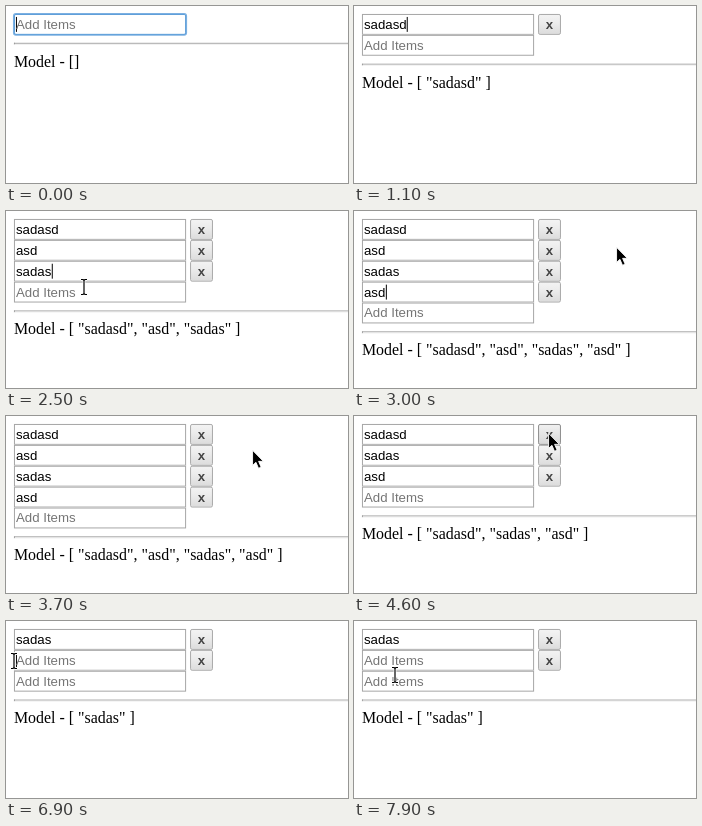
An HTML page for the animation above (8000 ms loop, 342 by 177 pixels).

```html
<!DOCTYPE html>
<html lang="en">
<head>
<meta charset="utf-8">
<title>Editable list</title>
<style>
  html, body { margin: 0; width: 100%; height: 100%; overflow: hidden; background: #fff; }
  #stage { position: relative; width: 342px; height: 177px; overflow: hidden; }
  #page { position: absolute; left: 0; top: 0; width: 350px; height: 177px; transform: scale(.995); transform-origin: 0 0; }
  #page > * { position: absolute; box-sizing: border-box; white-space: pre; }
  .field {
    left: 8px; width: 173px; height: 21px; padding: 2px 1px;
    border: 1px solid #a6a6a6; background: #fff; color: #000;
    font: 13.333px/15px "Liberation Sans", Arial, sans-serif;
  }
  .field.ring { border-color: #5b9dd9; border-radius: 2px; box-shadow: 0 0 0 1px #7db1e2; }
  .hint { color: #757575; }
  .picked { display: inline-block; height: 15px; background: #1e90ff; color: #fff; }
  .caret {
    display: inline-block; width: 1px; height: 15px; margin-right: -1px;
    background: #000; vertical-align: top;
  }
  .remove {
    left: 185px; width: 23px; height: 21px; border: 1px solid #a9a9a9; border-radius: 2px;
    background: linear-gradient(#f3f3f3, #ececec 40%, #dcdcdc);
    color: #444; text-align: center;
    font: bold 13.333px/19px "Liberation Sans", Arial, sans-serif;
  }
  .remove.hover { border-color: #8c8c8c; background: linear-gradient(#f0f0f0, #e6e6e6 40%, #d8d8d8); }
  #rule { left: 8px; width: 340px; height: 2px; border: 1px solid #9a9a9a; border-bottom-color: #eee; }
  #model { left: 8px; font: 16px/18px "Liberation Serif", Times, serif; color: #000; }
  #pointer { position: absolute; left: 0; top: 0; width: 20px; height: 24px; overflow: visible; }
</style>
</head>
<body>
<div id="stage">
  <div id="page">
    <div id="rule"></div>
    <div id="model"></div>
  </div>
  <svg id="pointer" viewBox="0 0 20 24">
    <path id="arrow" transform="translate(0 -1) scale(1.1)" d="M.5 .3V14L3.6 11.2L5.9 16.6L8.3 15.6L6 10.3H10.3Z" fill="#000" stroke="#fff" stroke-width=".8"/>
    <g id="beam" fill="none">
      <path id="bar" d="M-3 -7.5H-1L0 -6.5L1 -7.5H3M0 -6.5V6.5M-3 7.5H-1L0 6.5L1 7.5H3" stroke="#fff" stroke-width="2.4"/>
      <use href="#bar" style="stroke: #000"/>
      <path d="M-3 -7.5H-1L0 -6.5L1 -7.5H3M0 -6.5V6.5M-3 7.5H-1L0 6.5L1 7.5H3" stroke="#000" stroke-width="1.2"/>
    </g>
  </svg>
</div>
<script>
const LOOP = 8000, STEP = 100, LETTER = 80, TRAVEL = 500, FOCUS = 700;
const TOP = 8, PITCH = 21, TEXT_LEFT = 10, LETTER_WIDTH = 7.2;
const $ = id => document.getElementById(id);

// What the user does, in order
const script = [
  { at: 0, row: 0, ring: true, hold: 100 },
  { at: 700, row: 0, type: "sadasd" },
  { at: 1600, row: 1, type: "asd" },
  { at: 2000, row: 2, type: "sadas" },
  { at: 2600, row: 3, type: "asd" },
  { at: 4300, remove: 1 },
  { at: 4700, remove: 0 },
  { at: 5900, row: 1, drag: true, hold: 1000 },
  { at: 6900, row: 1, type: "" }
];

// Where the pointer comes to rest; it sets off TRAVEL ms earlier
const stops = [
  { at: 1300, x: 140, y: 58 },
  { at: 1500, x: 84, y: 40 },
  { at: 2500, x: 78, y: 76 },
  { at: 3100, x: 283, y: 32 },
  { at: 3700, x: 246, y: 35 },
  { at: 4200, x: 196, y: 38 },
  { at: 4600, x: 194, y: 18 },
  { at: 5700, x: 97, y: 39 },
  { at: 5900, x: 36, y: 40 },
  { at: 6300, x: 8, y: 40 },
  { at: 7900, x: 41, y: 54 }
];

function rowsAt(t) {
  const rows = [];
  for (const { at, row, type, remove } of script) {
    if (t < at) break;
    if (type !== undefined) rows[row] = type.slice(0, Math.floor((t - at) / LETTER) + 1);
    if (remove !== undefined) rows.splice(remove, 1);
  }
  return rows;
}

function focusAt(t) {
  const last = script.filter(s => s.at <= t).pop();
  return t < last.at + (last.hold || FOCUS) ? last : {};
}

function pointerAt(t) {
  if (t < stops[0].at) return null;
  const i = stops.findIndex(s => s.at > t);
  if (i < 0) return stops[stops.length - 1];
  const a = stops[i - 1], b = stops[i];
  const span = Math.min(TRAVEL, b.at - a.at);
  const k = Math.max(0, 1 - (b.at - t) / span), ease = k * k * (3 - 2 * k);
  return { x: Math.round(a.x + (b.x - a.x) * ease), y: Math.round(a.y + (b.y - a.y) * ease) };
}

function add(parent, tag, cls, text = "") {
  const el = document.createElement(tag);
  el.className = cls;
  el.textContent = text;
  parent.append(el);
  return el;
}

const show = (el, on) => { el.style.display = on ? "" : "none"; };

const pool = Array.from({ length: 5 }, (_, i) => {
  const field = add($("page"), "div", "field");
  const button = add($("page"), "div", "remove", "x");
  field.style.top = button.style.top = TOP + i * PITCH + "px";
  return { field, button };
});

// Text before the caret, then the caret or the text picked by dragging
function drawField(field, text, focus, pos) {
  const letter = focus && focus.drag ? Math.round((pos.x - TEXT_LEFT) / LETTER_WIDTH) : text.length;
  const from = Math.max(0, Math.min(text.length, letter));
  field.textContent = text.slice(0, from);
  if (from < text.length) add(field, "span", "picked", text.slice(from));
  else if (focus) add(field, "span", "caret");
  if (!text) add(field, "span", "hint", "Add Items");
}

function drawPointer(pos, bottom) {
  show($("pointer"), pos);
  if (!pos) return;
  const inField = pos.x < 181 && pos.y >= TOP && pos.y < bottom;
  $("pointer").style.transform = `translate(${pos.x}px, ${pos.y}px)`;
  show($("beam"), inField);
  show($("arrow"), !inField);
}

function draw(t) {
  const rows = rowsAt(t), focus = focusAt(t), pos = pointerAt(t);
  const bottom = TOP + (rows.length + 1) * PITCH;

  pool.forEach(({ field, button }, i) => {
    const focused = focus.row === i;
    const y = TOP + i * PITCH;
    const over = pos && Math.abs(pos.x - 196) < 12 && pos.y >= y && pos.y < y + PITCH;
    show(field, i <= rows.length);
    show(button, i < rows.length);
    drawField(field, rows[i] || "", focused && focus, pos);
    field.classList.toggle("ring", !!(focused && focus.ring));
    button.classList.toggle("hover", !!over);
  });

  const items = rows.filter(Boolean).map(s => `"${s}"`).join(", ");
  $("model").textContent = "Model - " + (items ? `[ ${items} ]` : "[]");
  $("model").style.top = bottom + 18 + "px";
  $("rule").style.top = bottom + 8 + "px";
  drawPointer(pos, bottom);
}

let shown = -1;
const begin = performance.now();
function tick() {
  const t = Math.floor(((performance.now() - begin) % LOOP) / STEP) * STEP;
  if (t !== shown) draw(shown = t);
  requestAnimationFrame(tick);
}
tick();
</script>
</body>
</html>
```
